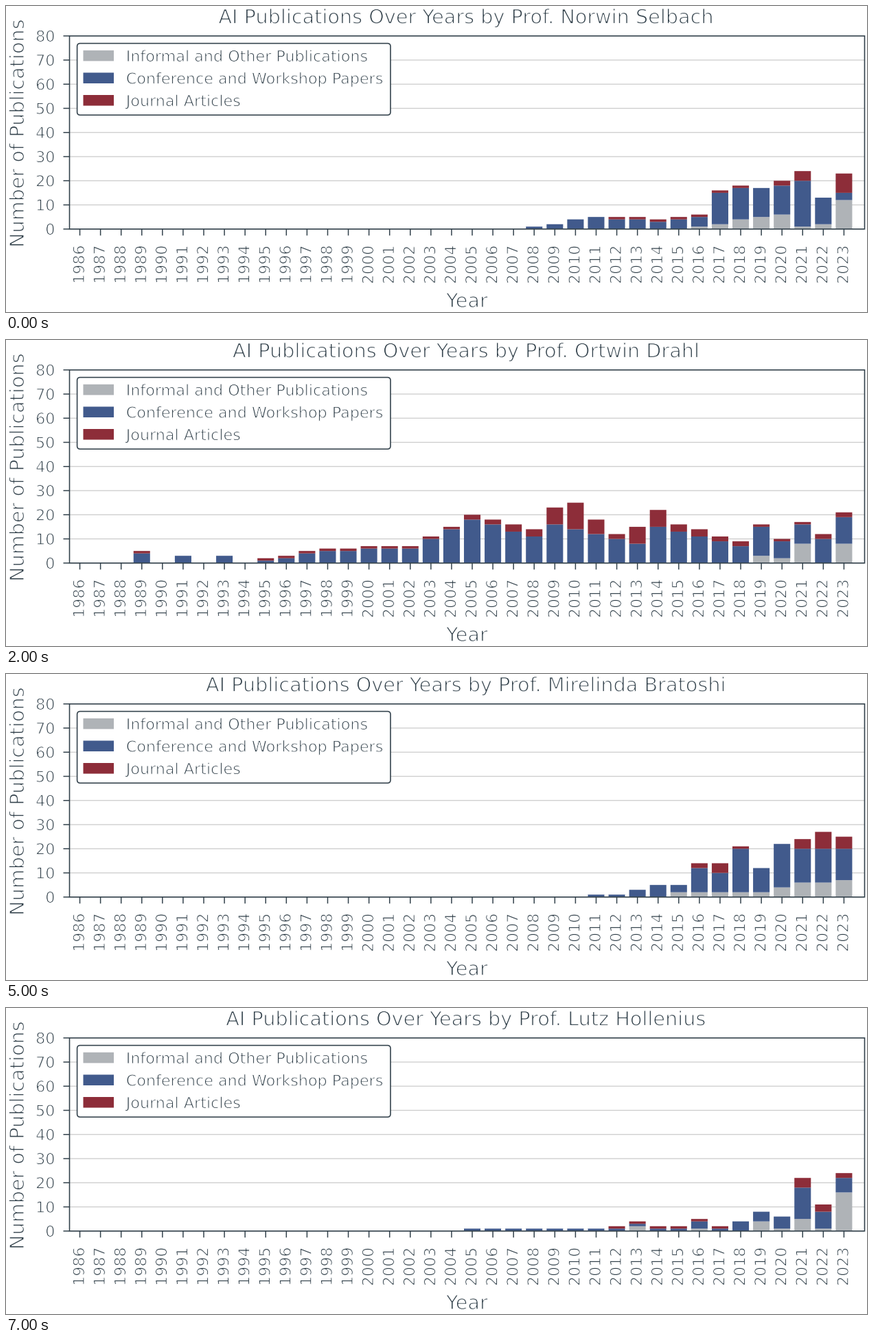
Write a matplotlib script that moves like this. It is 1254x447 px and loops after 8000 ms.

```python
import numpy as np
import matplotlib.pyplot as plt
from matplotlib.animation import FuncAnimation
from matplotlib.patches import FancyBboxPatch, Rectangle
from matplotlib.patheffects import Stroke

W, H, DPI = 1254, 447, 72          # at 72 dpi one point is one pixel
LEFT, RIGHT, TOP, BOTTOM = 92.5, 1250.5, 43.7, 325.8
YEARS = np.arange(1986, 2024)
STEP = (RIGHT - LEFT) / 38.5
CENTERS = LEFT + (np.arange(len(YEARS)) + 0.5) * STEP
INK, GRID = "#32414b", "#cccccc"
KINDS = [
    ("Informal and Other Publications", "#afb3b7"),
    ("Conference and Workshop Papers", "#415a8c"),
    ("Journal Articles", "#8d2d39"),
]
BIG, SMALL = 28.7, 22.25


def trend(points):
    """Whole yearly counts along straight lines between turning points."""
    return np.rint(np.interp(YEARS, list(points), list(points.values()),
                             left=0))


def growth(start, end, seed):
    """Three noisy series that rise from the start year to the end count."""
    rng = np.random.default_rng(seed)
    ramp = np.clip((YEARS - start + 1) / (2024 - start), 0, 1) * end
    shares = np.array([[0.25], [0.6], [0.15]])
    counts = np.rint(shares * ramp * rng.uniform(0.6, 1.4, (3, len(YEARS))))
    counts[1, YEARS == start] = 1
    return counts


def career(*series):
    return np.array([trend(points) for points in series])


PEOPLE = [
    ("Norwin Selbach", career(
        {2015: 0, 2020: 6, 2021: 1, 2022: 2, 2023: 12},
        {2007: 0, 2011: 5, 2014: 3, 2016: 4, 2017: 13, 2020: 12, 2021: 19,
         2023: 3},
        {2011: 0, 2012: 1, 2018: 1, 2019: 0, 2021: 4, 2022: 0, 2023: 8})),
    ("Volkmar Distling", growth(1990, 5, seed=3)),
    ("Ortwin Drahl", career(
        {2018: 0, 2019: 3, 2020: 2, 2021: 8, 2022: 0, 2023: 8},
        {1989: 4, 1990: 0, 1991: 3, 1992: 0, 1993: 3, 1994: 0, 1998: 5,
         2002: 6, 2005: 18, 2008: 11, 2009: 16, 2013: 8, 2014: 15, 2018: 7,
         2019: 12, 2020: 7, 2023: 11},
        {1989: 1, 1990: 0, 1994: 0, 1995: 1, 2003: 1, 2008: 3, 2010: 11,
         2012: 2, 2013: 7, 2014: 7, 2015: 3, 2020: 1, 2023: 2})),
    ("Reinhold Bröndelitz", career(
        {2007: 0, 2008: 2, 2011: 2, 2012: 13, 2014: 4, 2016: 9, 2017: 5,
         2018: 17, 2020: 20, 2022: 17, 2023: 40},
        {1994: 0, 2001: 8, 2003: 5, 2005: 15, 2009: 10, 2010: 16, 2012: 11,
         2013: 16, 2015: 14, 2017: 19, 2020: 21, 2022: 45, 2023: 31},
        {1994: 0, 1997: 1, 1998: 5, 1999: 2, 2005: 6, 2009: 2, 2010: 5,
         2012: 2, 2015: 4, 2016: 11, 2017: 3, 2022: 4, 2023: 7})),
    ("Wendel Osterick", career(
        {2015: 0, 2016: 6, 2017: 2, 2019: 0, 2021: 8, 2022: 4, 2023: 12},
        {2010: 1, 2011: 7, 2012: 9, 2013: 4, 2018: 7, 2020: 4, 2022: 9,
         2023: 6},
        {2012: 1, 2013: 1, 2014: 0, 2015: 0, 2016: 1, 2018: 1, 2022: 3,
         2023: 0})),
    ("Mirelinda Bratoshi", career(
        {2014: 0, 2015: 2, 2019: 2, 2021: 6, 2023: 7},
        {2011: 1, 2012: 1, 2014: 5, 2015: 3, 2016: 10, 2017: 8, 2018: 18,
         2019: 10, 2020: 18, 2021: 14, 2023: 13},
        {2015: 0, 2017: 4, 2018: 1, 2019: 0, 2020: 0, 2022: 7, 2023: 5})),
    ("Friedhelm Solbeck", growth(2008, 20, seed=8)),
    ("Lutz Hollenius", career(
        {2012: 0, 2013: 2, 2014: 0, 2016: 1, 2018: 0, 2019: 4, 2020: 1,
         2021: 5, 2022: 1, 2023: 16},
        {2005: 1, 2015: 1, 2016: 3, 2017: 1, 2018: 4, 2020: 5, 2021: 13,
         2022: 7, 2023: 6},
        {2011: 0, 2012: 1, 2016: 1, 2020: 0, 2021: 4, 2023: 2})),
]


def height(count):
    return count / 80 * (BOTTOM - TOP)


def label(x, y, s, size, ha="left", rotation=0):
    """Text on a baseline; a white outline trims it to a light weight."""
    return ax.text(x, y, s, fontsize=size, ha=ha, va="baseline", color=INK,
                   family="DejaVu Sans", rotation=rotation,
                   rotation_mode="anchor", zorder=5,
                   path_effects=[Stroke(linewidth=0.042 * size,
                                        foreground="white")])


def line(xs, ys, color=INK, width=1.5, zorder=3):
    ax.plot(xs, ys, color=color, lw=width, zorder=zorder, snap=False,
            solid_capstyle="butt")


def box(x, y, w, h, **style):
    ax.add_patch(Rectangle((x, y), w, h, snap=False, **style))


# One axes over the whole figure, in pixels with y downwards.
fig = plt.figure(figsize=(W / DPI, H / DPI), dpi=DPI, facecolor="white")
ax = fig.add_axes([0, 0, 1, 1])
ax.set(xlim=(0, W), ylim=(H, 0))
ax.axis("off")

for n in range(0, 81, 10):
    y = BOTTOM - height(n)
    line([LEFT, RIGHT], [y, y], GRID, 1.27, zorder=1)
    line([LEFT - 9, LEFT], [y, y])
    label(71.5, y + 8.2, str(n), SMALL, ha="right")
for x, year in zip(CENTERS, YEARS):
    line([x, x], [BOTTOM, BOTTOM + 9.5])
    label(x + 6.3, 349.5, str(year), SMALL, ha="right", rotation=90)
box(LEFT, TOP, RIGHT - LEFT, BOTTOM - TOP, fill=False, ec=INK, lw=1.6,
    zorder=3)

ax.add_patch(FancyBboxPatch((103.6, 54.6), 456.4, 104.7, fc="white", ec=INK,
                            lw=1.6, zorder=4, snap=False,
                            boxstyle="round,pad=0,rounding_size=4.45"))
for row, (kind, color) in enumerate(KINDS):
    y = 64.8 + 32.6 * row
    box(112.5, y, 44.5, 15.6, fc=color, lw=0, zorder=5)
    label(174.8, y + 16.2, kind, SMALL)

middle = (LEFT + RIGHT) / 2
label(middle, 440, "Year", BIG, ha="center")
label(26, 185.4, "Number of Publications", BIG, ha="center", rotation=90)
title = label(middle, 25.5, "", BIG, ha="center")

stacks = [ax.bar(CENTERS, 0, 0.8 * STEP, color=color, lw=0, zorder=2,
                 snap=False) for _, color in KINDS]


def draw(i):
    name, counts = PEOPLE[i]
    title.set_text(f"AI Publications Over Years by Prof. {name}")
    tops = BOTTOM - height(np.cumsum(counts, axis=0))
    for stack, row, values in zip(stacks, tops, counts):
        for bar, top, value in zip(stack, row, values):
            bar.set(y=top, height=height(value))
    return [title]


anim = FuncAnimation(fig, draw, frames=len(PEOPLE), interval=1000,
                     repeat=True, repeat_delay=0, blit=False)
plt.show()
```
